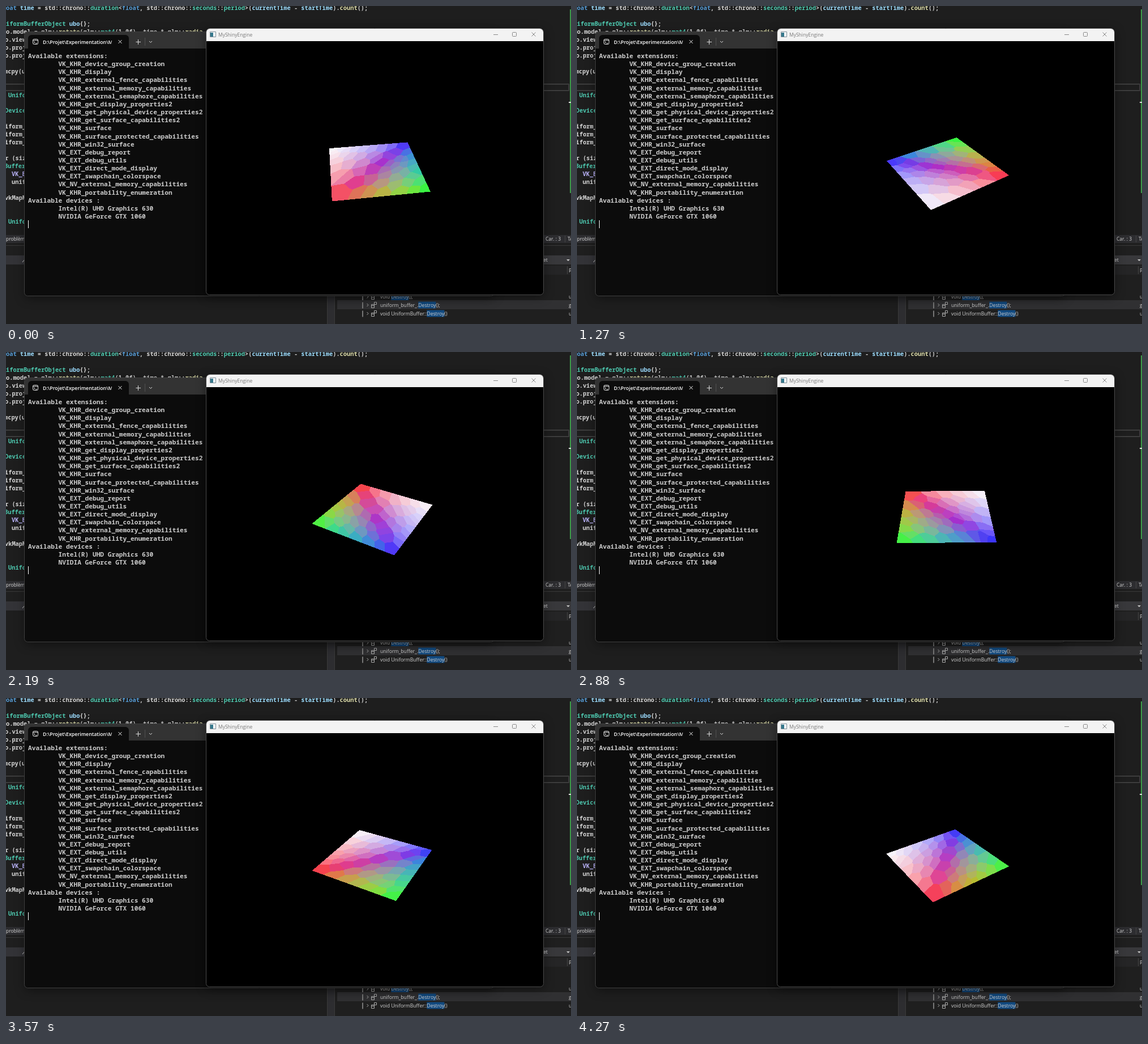
Recreate the animation shown at these times as an HTML page with a canvas. Size 998x561 px, loop 4.37 s.

```html
<!DOCTYPE html>
<html lang="en">
<head>
<meta charset="utf-8">
<title>Spinning quad</title>
<style>
html, body { margin: 0; width: 100%; height: 100%; overflow: hidden; background: #1e1e1e; }
canvas { display: block; }
</style>
</head>
<body>
<canvas id="stage" width="998" height="561"></canvas>
<script>
const ctx = document.getElementById('stage').getContext('2d');
const MONO = '"Noto Sans Mono", "DejaVu Sans Mono", monospace';
const SANS = '"Open Sans", "Noto Sans", sans-serif';
const TEAL = '#4ec9b0', PLAIN = '#d4d4d4', BLUE = '#569cd6', PALE = '#9cdcfe', GOLD = '#dcdcaa';

function rect(x, y, w, h, color) {
  ctx.fillStyle = color;
  ctx.fillRect(x, y, w, h);
}

function panel(x, y, w, h, r, color) {
  ctx.fillStyle = color;
  ctx.beginPath();
  ctx.roundRect(x, y, w, h, r);
  ctx.fill();
}

function outline(x, y, w, h, r, color) {
  ctx.strokeStyle = color;
  ctx.lineWidth = 1;
  ctx.beginPath();
  ctx.roundRect(x + 0.5, y + 0.5, w - 1, h - 1, r);
  ctx.stroke();
}

function line(color, ...pts) {
  ctx.strokeStyle = color;
  ctx.lineWidth = 1;
  ctx.beginPath();
  for (let i = 0; i < pts.length; i += 2) ctx.lineTo(pts[i], pts[i + 1]);
  ctx.stroke();
}

function cross(x, y, r, color) {
  line(color, x - r, y - r, x + r, y + r);
  line(color, x - r, y + r, x + r, y - r);
}

// Draws runs of [text, color] one after the other, centred on y.
function runs(x, y, font, ...parts) {
  ctx.font = font;
  ctx.textBaseline = 'alphabetic';
  for (const [text, color] of parts) {
    ctx.fillStyle = color;
    ctx.fillText(text, x, y + 3.6);
    x += ctx.measureText(text).width;
  }
}

const code = (x, y, ...parts) => runs(x, y, '600 10.35px ' + MONO, ...parts);
const label = (x, y, text, color, size = 8.4, weight = 400) =>
  runs(x, y - 0.5, `${weight} ${size}px ${SANS}`, [text, color]);

function withShadow(blur, draw) {
  ctx.save();
  ctx.shadowColor = 'rgba(0,0,0,.4)';
  ctx.shadowBlur = blur;
  ctx.shadowOffsetY = 4;
  draw();
  ctx.restore();
}

function drawEditor() {
  rect(0, 0, 998, 561, '#1e1e1e');
  outline(-2, 137, 997, 13, 0, '#464646');
  outline(-1, 138, 995, 11, 0, '#333');
  code(0, 3, ['oat', BLUE], [' time', PALE], [' = std::chrono::', PLAIN], ['duration', TEAL], ['<', PLAIN],
    ['float', BLUE], [', std::chrono::', PLAIN], ['seconds', TEAL], ['::', PLAIN], ['period', TEAL],
    ['>(', PLAIN], ['currentTime', PALE], [' - ', PLAIN], ['startTime', PALE], [').', PLAIN],
    ['count', GOLD], ['();', PLAIN]);
  code(0, 31, ['iformBufferObject', TEAL], [' ubo', PALE], ['{};', PLAIN]);
  code(0, 45, ['o.model = glm::', PLAIN], ['rotate', GOLD], ['(glm::', PLAIN], ['mat4', TEAL],
    ['(1.0f), time * glm::', PLAIN], ['radia', GOLD]);
  const clipped = [
    [59, -2, 'o.view', PLAIN], [73, -2, 'o.proj', PLAIN], [87, -2, 'o.proj', PLAIN], [115, -3, 'mcpy(u', PLAIN],
    [157, 4, 'Unifor', TEAL], [184, -2, 'Device', TEAL], [212, -2, 'iform_', PLAIN], [226, -2, 'iform_', PLAIN],
    [240, -2, 'iform_', PLAIN], [268, -2, 'r (size', PLAIN], [282, -3, 'Buffer', TEAL], [296, 10, 'VK_B', '#beb7ff'],
    [310, 10, 'unif', PLAIN], [338, -2, 'vkMapM', PLAIN], [380, 4, 'Unifor', TEAL]];
  for (const [y, x, text, color] of clipped) code(x, y, [text, color]);

  rect(996, 6, 2, 324, '#3c9a48');
  rect(994, 169, 4, 2, '#ddd');

  rect(0, 404, 998, 14, '#2d2d30');
  label(0, 411, 'problème', '#ddd');
  label(953, 411, 'Car. : 3', '#ddd');
  rect(987, 405, 1, 12, '#444');
  label(992, 411, 'TA', '#ddd');
  rect(0, 418, 998, 22, '#1f1f1f');
  rect(0, 422, 998, 1, '#3a3a3a');
  rect(0, 440, 40, 16, '#333337');
  line('#ccc', 29, 452, 34, 446);
}

function drawResults() {
  rect(567, 456, 18, 105, '#2d2d30');
  rect(567, 456, 1, 105, '#3a3a3a');
  rect(580, 456, 1, 105, '#3a3a3a');
  rect(581, 456, 417, 105, '#1f1f1f');
  rect(900, 440, 98, 16, '#38383b');
  label(949, 448, 'et', '#ddd');
  ctx.fillStyle = '#ccc';
  ctx.beginPath();
  ctx.moveTo(990, 447);
  ctx.lineTo(996, 447);
  ctx.lineTo(993, 450);
  ctx.fill();
  rect(900, 458, 98, 16, '#252526');
  rect(991, 459, 1, 14, '#444');
  label(994, 467, 'P', '#ddd');
  rect(585, 519, 413, 16, '#303032');

  const size = 8.65;
  const rows = [
    [513, 'void ', 'Destroy', '();', 'u'],
    [527.5, 'uniform_buffer_.', 'Destroy', '();', 'g'],
    [542.5, 'void UniformBuffer::', 'Destroy', '()', 'u']];
  for (const [y, head, hit, tail, side] of rows) {
    rect(629, y - 5, 2, 11, '#777');
    line('#aaa', 637.5, y - 2.5, 640, y, 637.5, y + 2.5);
    outline(645, Math.round(y) - 2, 6, 7, 0, '#aaa');
    outline(650, Math.round(y) - 6, 5, 5, 0, '#aaa');
    line('#aaa', 646, y + 1, 650, y + 1);
    ctx.font = `400 ${size}px ${SANS}`;
    const x = 661 + ctx.measureText(head).width;
    rect(x, y - 6, ctx.measureText(hit).width, 12, '#124a80');
    label(661, y, head + hit + tail, '#d0d0d0', size);
    label(994, y, side, '#d0d0d0', size);
  }
}

function drawTerminal() {
  withShadow(18, () => panel(33, 45, 829, 467, 6, '#0c0c0c'));
  panel(33, 45, 829, 30, [6, 6, 0, 0], '#333333');
  panel(39, 51, 178, 25, [6, 6, 0, 0], '#0c0c0c');
  outline(32, 45, 831, 467, 6, '#404040');

  outline(47, 58, 10, 10, 2, '#ddd');
  line('#ddd', 47, 60.5, 57, 60.5);
  line('#ddd', 49, 62, 51, 64, 49, 66);
  line('#ddd', 52, 66, 55, 66);
  ctx.save();
  ctx.beginPath();
  ctx.rect(60, 52, 127, 22);
  ctx.clip();
  label(65, 64, 'D:\\Projet\\Experimentation\\My', '#fff', 8.8, 600);
  ctx.restore();
  cross(201.5, 63, 3, '#eee');
  line('#ddd', 229.5, 63.5, 238, 63.5);
  line('#ddd', 233.5, 59, 233.5, 68);
  rect(245, 56, 1, 14, '#505050');
  line('#ddd', 253, 62, 255.5, 64.5, 258, 62);

  const khr = 'device_group_creation display external_fence_capabilities external_memory_capabilities ' +
    'external_semaphore_capabilities get_display_properties2 get_physical_device_properties2 ' +
    'get_surface_capabilities2 surface surface_protected_capabilities win32_surface';
  const ext = 'debug_report debug_utils direct_mode_display swapchain_colorspace';
  const named = (prefix, names) => names.split(' ').map(n => '\t' + prefix + n);
  const output = ['Available extensions:', ...named('VK_KHR_', khr), ...named('VK_EXT_', ext),
    '\tVK_NV_external_memory_capabilities', '\tVK_KHR_portability_enumeration',
    'Available devices :', '\tIntel(R) UHD Graphics 630', '\tNVIDIA GeForce GTX 1060'];
  output.forEach((text, i) =>
    runs(39, 88.4 + i * 14.15, '600 11.18px ' + MONO, [text.replace('\t', ' '.repeat(8)), '#ccc']));
  rect(39, 378, 1, 14, '#fff');
}

function drawEngineWindow() {
  withShadow(18, () => panel(353, 39, 597, 470, 6, '#000'));
  outline(353, 39, 597, 471, 6, '#4a4a4a');
  panel(354, 40, 595, 22, [6, 6, 0, 0], '#f3f3f3');
  rect(360, 45, 11, 10, '#fff');
  outline(360, 45, 11, 10, 0, '#7a8a94');
  rect(361, 47, 5, 7, '#35788c');
  label(375, 51, 'MyShinyEngine', '#777', 8.5);
  line('#888', 861, 50.5, 869, 50.5);
  outline(894, 46, 8, 8, 1, '#888');
  cross(932, 50, 3.5, '#888');
}

// Perspective camera at (2, 2, 2) looking at the origin, 45° field of view.
const CX = 651.5, CY = 285.5, FOCAL = 223.5 / Math.tan(Math.PI / 8);
const VIEW = { x: 532, y: 224, w: 240, h: 146 };
const SHADES = 56;

function random(seed) {
  return () => {
    seed = (seed + 0x6d2b79f5) | 0;
    let t = Math.imul(seed ^ (seed >>> 15), 1 | seed);
    t = (t + Math.imul(t ^ (t >>> 7), 61 | t)) ^ t;
    return ((t ^ (t >>> 14)) >>> 0) / 4294967296;
  };
}

const srgb = c => 255 * (c <= 0.0031308 ? 12.92 * c : 1.055 * c ** (1 / 2.4) - 0.055);

// Linear colour: red, green, blue and white corners, split along red-blue.
const quadColor = (u, v) => [1 - u, Math.abs(u - v), v];

function nearest(shades, [r, g, b]) {
  let best = 0, min = Infinity;
  shades.forEach((s, i) => {
    const d = (s[0] - r) ** 2 + (s[1] - g) ** 2 + (s[2] - b) ** 2;
    if (d < min) { min = d; best = i; }
  });
  return best;
}

// Reduces the quad's gradient to a few shades with k-means.
function makeShades(seed) {
  const rnd = random(seed * 977 + 5), samples = [];
  for (let i = 0; i < 900; i++) {
    samples.push(quadColor((i % 30 + rnd()) / 30, (Math.floor(i / 30) + rnd()) / 30));
  }
  let shades = Array.from({ length: SHADES }, () => samples[Math.floor(rnd() * samples.length)]);
  for (let pass = 0; pass < 6; pass++) {
    const sums = shades.map(() => [0, 0, 0, 0]);
    for (const c of samples) {
      const sum = sums[nearest(shades, c)];
      c.forEach((value, k) => { sum[k] += value; });
      sum[3]++;
    }
    shades = sums.map((s, i) => s[3] ? [s[0] / s[3], s[1] / s[3], s[2] / s[3]] : shades[i]);
  }
  return shades;
}

function renderQuad(angle, seed) {
  const img = ctx.createImageData(VIEW.w, VIEW.h), shades = makeShades(seed);
  const colors = shades.map(s => s.map(srgb));
  const cos = Math.cos(angle), sin = Math.sin(angle);
  for (let j = 0, p = 0; j < VIEW.h; j++) {
    const y = VIEW.y + j + 0.5 - CY;
    const near = 6 * y / (FOCAL + Math.SQRT2 * y);
    const depth = (6 - Math.SQRT2 * near) / (FOCAL * Math.sqrt(3));
    for (let i = 0; i < VIEW.w; i++, p += 4) {
      const side = (VIEW.x + i + 0.5 - CX) * depth;
      const a = near * cos + side * sin, b = side * cos - near * sin;
      const u = 0.5 + (b - a) / Math.SQRT2, v = 0.5 - (a + b) / Math.SQRT2;
      if (u >= 0 && u <= 1 && v >= 0 && v <= 1) {
        img.data.set(colors[nearest(shades, quadColor(u, v))], p);
      }
      img.data[p + 3] = 255;
    }
  }
  return img;
}

const LOOP = 4370;
const steps = [0, 100, 250, 350, 480, 740, 1270, 1370, 1490, 1610, 1810, 1990, 2130, 2190, 2660, 2770, 2880,
  3000, 3100, 3190, 3290, 3380, 3480, 3570, 3670, 3770, 3870, 3970, 4070, 4170, 4270];

const poses = steps.map((_, i) => {
  const time = (steps[i + 1] ?? LOOP) - 100;
  return renderQuad((-36.5 + 0.0905 * time) * Math.PI / 180, i);
});

drawEditor();
drawResults();
drawTerminal();
drawEngineWindow();

let shown = -1;
const start = performance.now();
function tick() {
  const t = (performance.now() - start) % LOOP;
  const i = steps.findLastIndex(s => s <= t);
  if (i !== shown) {
    ctx.putImageData(poses[i], VIEW.x, VIEW.y);
    shown = i;
  }
  requestAnimationFrame(tick);
}
tick();
</script>
</body>
</html>
```
